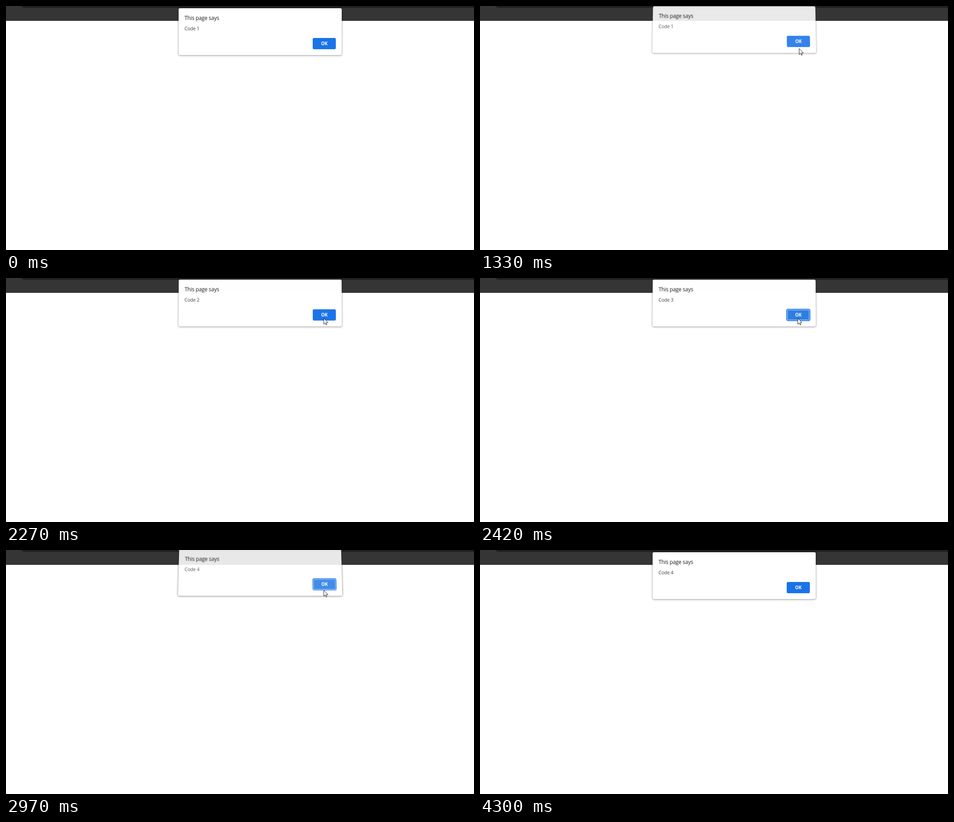
An HTML page that plays this animation: 1033x542 px, repeating every 4370 ms.

```html
<!DOCTYPE html>
<html lang="en">
<head>
<meta charset="utf-8">
<title>Alert sequence</title>
<style>
html, body { margin: 0; width: 100%; height: 100%; overflow: hidden; background: #fff; }
body { position: relative; font-family: "Open Sans", "Noto Sans", sans-serif; }
div, span, svg { position: absolute; }
.bar { left: 0; top: 0; width: 100%; height: 33px; background: #353535; }
.tab { left: 31px; right: 0; top: -10px; height: 14px; background: #202024; border-radius: 0 0 0 11px; }
.dialog {
  left: 381px; top: 5px; width: 360px; height: 104px;
  background: #fff; border-radius: 3px;
  box-shadow: 0 1px 4px rgba(0, 0, 0, .4), 0 0 1px rgba(0, 0, 0, .5);
}
.dialog span { left: 13px; white-space: pre; }
.title { top: 13px; font-size: 12px; line-height: 18px; letter-spacing: -.3px; color: #202124; }
.code { top: 37px; font-size: 10.5px; line-height: 16px; letter-spacing: -.2px; color: #3c4043; }
.ok {
  left: 296px; top: 66px; width: 51px; height: 25px; border-radius: 3px;
  background: #1a73e8; color: #fff; text-align: center;
  font-size: 10px; font-weight: 700; line-height: 25px; letter-spacing: -.2px;
}
.ok.hover { background: #2b7de3; }
.ok.ring { box-shadow: 0 0 0 1px #1a73e8, inset 0 0 0 1px #1a73e8, inset 0 0 0 2px #cfe1fb; }
#cursor { left: 0; top: 0; }
</style>
</head>
<body>
<div class="bar"><div class="tab"></div></div>
<svg id="cursor" width="12" height="18">
  <path d="M.5.5V13.8L3.6 10.9 5.6 15.4 7.4 14.6 5.4 10.2H9.8Z" fill="#fff" stroke="#111" stroke-width=".9"/>
</svg>
<script>
const LOOP = 4370, HOVER = 850, LEAVE = 3270, BLUR = 4300;
const cursor = document.getElementById('cursor');

// Each click closes one dialog and opens the next around swap
const clicks = [
  { start: 1150, swap: 1340, end: 1620, count: 6 },
  { start: 2090, swap: 2336, end: 2500, count: 5 },
  { start: 2740, swap: 2968, end: 3120, count: 5 }
];

// Cursor strokes, each easing to the point x, y
const strokes = [
  { start: 130, end: 630, count: 6, x: 719, y: 107 },
  { start: 630, end: HOVER, count: 3, x: 704, y: 94 },
  { start: 1750, end: 1870, count: 2, x: 701, y: 89 },
  { start: LEAVE - 1, end: LEAVE, count: 1, x: 1021, y: 389 }
];

// The screen refreshes only a few times during each movement
function refreshTime(time) {
  const span = [...clicks, ...strokes].find(s => time >= s.start && time < s.end);
  if (!span) return time;
  const gap = (span.end - span.start) / span.count;
  return span.start + Math.floor((time - span.start) / gap) * gap;
}

function makeDialog(number) {
  const box = document.createElement('div');
  box.className = 'dialog';
  box.innerHTML = `<span class="title">This page says</span>
    <span class="code">Code ${number}</span><div class="ok">OK</div>`;
  document.body.insertBefore(box, cursor);
  return { box, ok: box.querySelector('.ok') };
}
const dialogs = [1, 2, 3, 4].map(makeDialog);

function liftAt(t, opened, closed) {
  if (closed && t > closed.swap - 140) return 8 * ((t - closed.swap + 140) / 140) ** 1.9;
  if (opened && t < opened.end) return 7 * Math.exp((opened.swap - t) / 52);
  return 0;
}

function drawDialog({ box, ok }, i, t) {
  const opened = clicks[i - 1], closed = clicks[i];
  const visible = (!opened || t >= opened.swap) && (!closed || t <= closed.swap);
  box.style.display = visible ? 'block' : 'none';
  if (!visible) return;
  const lift = liftAt(t, opened, closed);
  box.style.opacity = 1 - .4 * (lift / 8) ** 2.5;
  box.style.transform = lift
    ? `translateY(${-lift}px) perspective(1000px) rotateX(${lift * 1.1}deg)` : 'none';
  ok.classList.toggle('hover', t >= HOVER && t < LEAVE && !(closed && t > closed.start));
  ok.classList.toggle('ring', i > 0 && t < (closed ? closed.start : BLUR));
}

function drawCursor(t) {
  const shown = t >= strokes[0].start && t < LEAVE + 70;
  cursor.style.display = shown ? 'block' : 'none';
  let x = 873, y = 337;
  for (const s of strokes) {
    const k = Math.min(1, Math.max(0, (t - s.start) / (s.end - s.start)));
    const eased = 1 - (1 - k) ** 1.6;
    x += (s.x - x) * eased;
    y += (s.y - y) * eased;
  }
  cursor.style.transform = `translate(${Math.round(x)}px, ${Math.round(y)}px)`;
}

const start = performance.now();
function draw() {
  const t = refreshTime(Math.max(0, performance.now() - start) % LOOP);
  dialogs.forEach((dialog, i) => drawDialog(dialog, i, t));
  drawCursor(t);
  requestAnimationFrame(draw);
}
draw();
</script>
</body>
</html>
```
